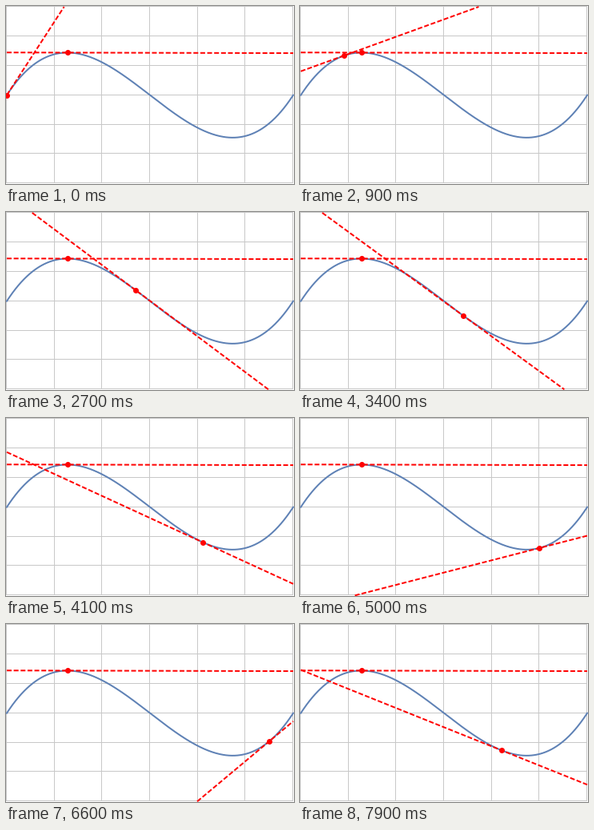
A matplotlib script for the animation above (8000 ms loop, 360 by 223 pixels).

```python
import numpy as np
import matplotlib.pyplot as plt
from matplotlib.animation import FuncAnimation

W, H, DPI = 360, 223, 64
PX = 72 / DPI  # points per pixel
FRAMES, INTERVAL, SWEEP = 80, 100, 60

# Plot box in pixels, y pointing down; the curve spans x = -1..1
LEFT, RIGHT, TOP, BOTTOM = 1, 359, 1, 222.3
CX, CY = (LEFT + RIGHT) / 2, (TOP + BOTTOM) / 2
SX, SY = (RIGHT - LEFT) / 2, (BOTTOM - TOP) / 1.6
STROKE = 2


def f(x):
    return x**3 - x


def slope(x):
    return 3 * x**2 - 1


def to_px(x, y):
    return CX + SX * x, CY - SY * y


def tangent(x):
    """End points of the tangent at x, clipped to the plot box."""
    px, py = to_px(x, f(x))
    m = -slope(x) * SY / SX
    lo, hi = LEFT, RIGHT
    if abs(m) > 1e-9:
        a, b = sorted(px + (edge - py) / m for edge in (TOP, BOTTOM))
        lo, hi = max(lo, a), min(hi, b)
    xs = np.array([lo, hi])
    return xs, py + m * (xs - px)


def position(i):
    """Sweep right at constant speed, rest one frame, then come back."""
    step = i if i <= SWEEP else 2 * SWEEP + 1 - i
    return -1 + 2 * step / SWEEP


fig = plt.figure(figsize=(W / DPI, H / DPI), dpi=DPI, facecolor="white")
ax = fig.add_axes([0, 0, 1, 1])
ax.set(xlim=(0, W), ylim=(H, 0))
ax.axis("off")

# Grid lines snap to whole pixels, so they sit one pixel up and left
grid = dict(color="#c8c8c8", lw=PX, antialiased=False, snap=True, zorder=1)
for gx in np.linspace(LEFT, RIGHT, 7) - 1:
    ax.plot([gx, gx], [0, BOTTOM - 1], **grid)
for gy in np.linspace(TOP, BOTTOM, 7) - 1:
    ax.plot([0, RIGHT - 1], [gy, gy], **grid)

t = np.linspace(-1, 1, 300)
ax.plot(*to_px(t, f(t)), color="#5e81b5", lw=STROKE * PX, zorder=2)


def add_tangent():
    line, = ax.plot([], [], color="red", lw=STROKE * PX, snap=False, zorder=3,
                    dashes=(3, 1.32), dash_capstyle="butt")
    dot, = ax.plot([], [], "o", color="red", ms=7 * PX, mew=0, zorder=4)
    return line, dot


def place(pair, x):
    line, dot = pair
    line.set_data(*tangent(x))
    px, py = to_px(x, f(x))
    dot.set_data([px], [py])


fixed, moving = add_tangent(), add_tangent()
place(fixed, -0.5765)


def update(i):
    place(moving, position(i))
    return moving


anim = FuncAnimation(fig, update, frames=FRAMES, interval=INTERVAL,
                     repeat=True, repeat_delay=0)
plt.show()
```
